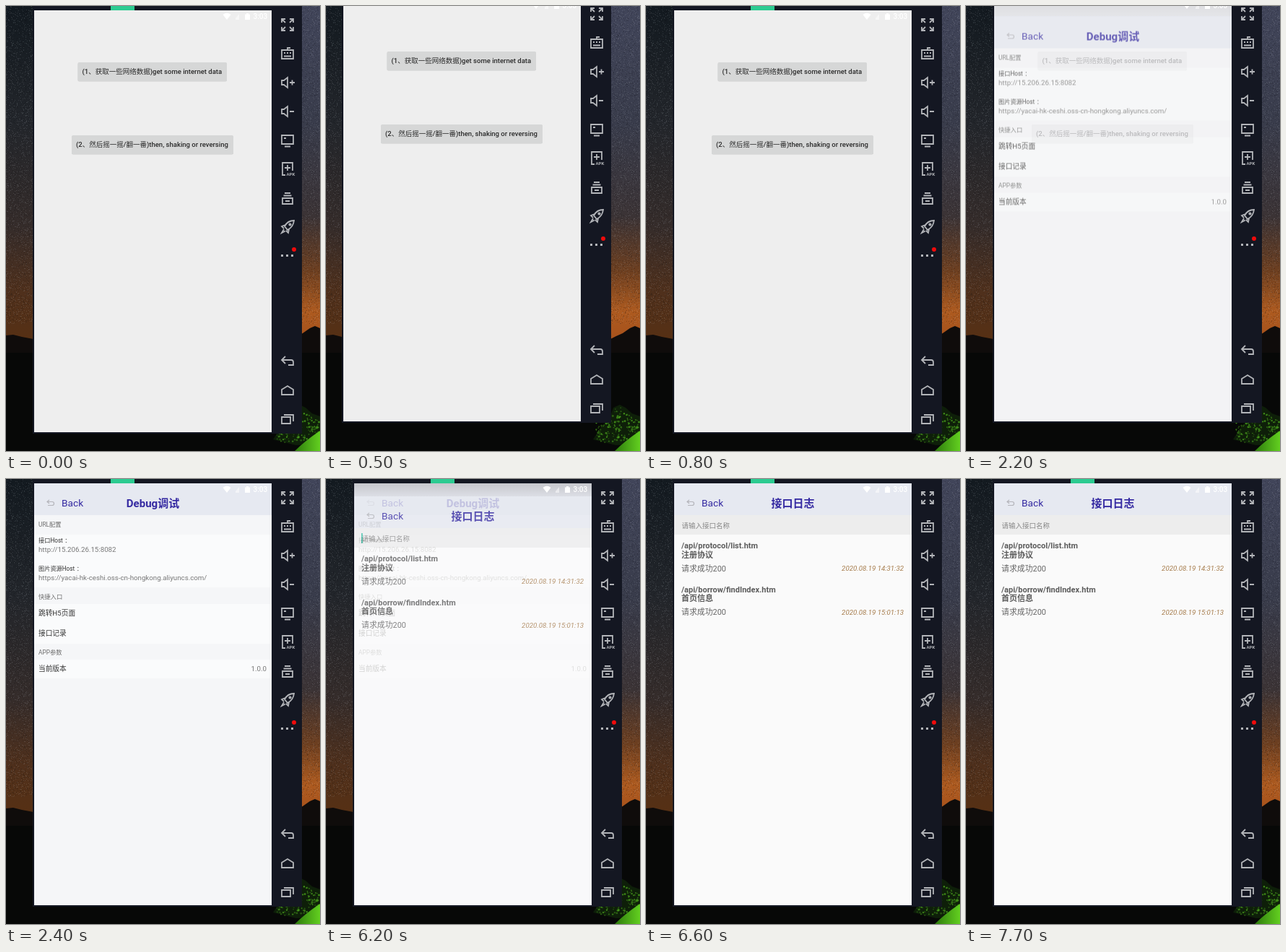
Recreate the animation shown at these times as an HTML page. Size 435 by 616 pixels, loop 8000 ms.

```html
<!DOCTYPE html>
<html lang="zh">
<head>
<meta charset="utf-8">
<title>Debug panel</title>
<style>
  html, body { margin: 0; width: 100%; height: 100%; overflow: hidden; background: #060707; }
  svg { display: block; width: 435px; height: 616px; }
  text { font-family: Roboto, "Noto Sans CJK SC", "Noto Sans CJK", sans-serif; }

  .btn { font-size: 9.5px; font-weight: 500; fill: #2b2b2b; }
  .nav { font-size: 13.7px; fill: #352aa2; }
  .title { font-size: 15px; font-weight: 700; fill: #352aa2; text-anchor: middle; }
  .sec { font-size: 8.3px; fill: #6c6c6c; }
  .key { font-size: 8.2px; fill: #333; }
  .val { font-size: 9.72px; fill: #777; }
  .row { font-size: 9.7px; fill: #333; }
  .api { font-size: 11px; font-weight: 700; fill: #5c5c5c; }
  .ok { font-size: 10.9px; fill: #666; }
  .date { font-size: 9.7px; font-style: italic; fill: #a67c4c; text-anchor: end; }
  .hint { font-size: 9.5px; fill: #868686; }
  .clock { font-size: 10px; font-weight: 500; fill: #fff; }
  .icon { fill: none; stroke: #b3b5b9; stroke-width: 1.8; }
  .solid { fill: #b3b5b9; stroke: none; }

  .win, .debug, .log, .dim1, .dim2, .caret { animation: 8s step-end infinite; }
  .win { animation-name: shake; }
  .debug { animation-name: debug; }
  .log { animation-name: log; }
  .dim1 { animation-name: dim1; }
  .dim2 { animation-name: dim2; }
  .caret { animation-name: blink; }

  @keyframes shake {
    0%, 10%, 28.75%, 100% { transform: none; }
    6.25% { transform: translate(-15px, -15px); }
    27.5% { transform: translate(0, -15px); }
  }
  @keyframes debug {
    0% { opacity: 0; transform: none; }
    27.5% { opacity: .72; transform: translateY(23.5px); }
    28.75% { opacity: .97; transform: translateY(3px); }
    30%, 100% { opacity: 1; transform: none; }
  }
  @keyframes log {
    0% { opacity: 0; transform: none; }
    77.5% { opacity: .8; transform: translateY(18px); }
    78.75%, 100% { opacity: 1; transform: none; }
  }
  @keyframes dim1 {
    0%, 28.75%, 100% { opacity: 0; }
    27.5% { opacity: .5; }
  }
  @keyframes dim2 {
    0%, 78.75%, 100% { opacity: 0; }
    77.5% { opacity: 1; }
  }
  @keyframes blink {
    0%, 88.75% { opacity: 1; }
    82.5%, 93.75%, 100% { opacity: 0; }
  }
</style>
</head>
<body>
<svg viewBox="0 0 435 616">
  <defs>
    <linearGradient id="west" x2="0" y2="1">
      <stop offset="0" stop-color="#131a20"/>
      <stop offset=".35" stop-color="#23262b"/>
      <stop offset=".65" stop-color="#352c2a"/>
      <stop offset=".84" stop-color="#4f301c"/>
      <stop offset="1" stop-color="#573013"/>
    </linearGradient>
    <linearGradient id="east" x2="0" y2="1">
      <stop offset="0" stop-color="#41455a"/>
      <stop offset=".35" stop-color="#393c4b"/>
      <stop offset=".62" stop-color="#3b3335"/>
      <stop offset=".78" stop-color="#6d3f20"/>
      <stop offset=".9" stop-color="#ad5a1f"/>
      <stop offset="1" stop-color="#a5501b"/>
    </linearGradient>
    <linearGradient id="bar" x2="0" y2="1">
      <stop offset="0" stop-color="#c6c7cc"/>
      <stop offset="1" stop-color="#dcdee5"/>
    </linearGradient>
    <linearGradient id="grass" x2="1" y2="0">
      <stop offset="0" stop-color="#2d7a0c"/>
      <stop offset="1" stop-color="#62cf20"/>
    </linearGradient>
    <clipPath id="screen"><path d="M39 6H368V590H39Z"/></clipPath>
    <g id="nav">
      <path d="M39 6H368V50H39Z" fill="#e6e9f1"/>
      <path d="M60 29l-3 2.5 3 2.5M57.500 31.500H64a2.500 2.500 0 0 1 0 5H58" fill="none" stroke="#b5b5bb" stroke-width="1.200"/>
      <text class="nav" x="77" y="38.300">Back</text>
    </g>
  </defs>

  <path d="M0 0H200V470H0Z" fill="url(#west)"/>
  <path d="M200 0H435V470H200Z" fill="url(#east)"/>
  <path id="stars" fill="#c3c6d2" opacity=".15"/>
  <path id="gaps" fill="#05060a" opacity=".22"/>
  <path d="M0 456L10 455 22 458 38 461 200 470 390 463 402 457 411 453 421 446 428 443 435 446V616H0Z" fill="#0f0c0b"/>
  <path d="M0 480H435V616H0Z" fill="#050606" opacity=".7"/>
  <path d="M370 600L380 584 393 570 398 556 407 552 415 556 424 564 435 568V606L402 608Z" fill="#0e1f09"/>
  <g id="leaves" fill="#479a1c"></g>
  <path d="M400 616Q414 602 435 588V616Z" fill="url(#grass)"/>

  <g class="win">
    <path d="M37 0H410V592H37Z" fill="#141722"/>
    <path d="M145 0H178V6H145Z" fill="#2ccb91"/>

    <g clip-path="url(#screen)">
      <path d="M39 6H368V590H39Z" fill="#eee"/>
      <g fill="#cdcdcd">
        <rect x="99.500" y="78.600" width="206.500" height="26" rx="2"/>
        <rect x="91" y="179.600" width="224" height="26" rx="2"/>
      </g>
      <g fill="#d6d7d7">
        <rect x="99.500" y="78" width="206.500" height="26" rx="2"/>
        <rect x="91" y="179" width="224" height="26" rx="2"/>
      </g>
      <text class="btn" x="105.500" y="94.300">(1、获取一些网络数据)get some internet data</text>
      <text class="btn" x="97" y="195.300">(2、然后摇一摇/翻一番)then, shaking or reversing</text>
      <path class="dim1" d="M39 6H368V30H39Z" fill="url(#bar)"/>

      <g class="debug">
        <path d="M39 6H368V590H39Z" fill="#f5f6f8"/>
        <path d="M39 77H368V150H39ZM39 173H368V228H39ZM39 250H368V276H39Z" fill="#fafbfc"/>
        <use href="#nav"/>
        <text class="title" x="203.500" y="39">Debug调试</text>
        <text class="sec" x="45" y="66">URL配置</text>
        <text class="key" x="45" y="88.300">接口Host<tspan dx="2.500">：</tspan></text>
        <text class="val" x="45" y="101">http://15.206.26.15:8082</text>
        <text class="key" x="45" y="127.300">图片资源Host<tspan dx="2.500">：</tspan></text>
        <text class="val" x="45" y="140">https://yacai-hk-ceshi.oss-cn-hongkong.aliyuncs.com/</text>
        <text class="sec" x="45" y="166">快捷入口</text>
        <text class="row" x="45" y="189">跳转H5页面</text>
        <text class="row" x="45" y="217">接口记录</text>
        <text class="sec" x="45" y="242.500">APP参数</text>
        <text class="row" x="45" y="266">当前版本</text>
        <text class="val" x="361" y="266" text-anchor="end">1.0.0</text>
      </g>

      <path class="dim2" d="M39 6H368V24H39Z" fill="url(#bar)"/>
      <g class="log">
        <path d="M39 6H368V590H39Z" fill="#fafafa"/>
        <path d="M39 50H368V77H39Z" fill="#ededed"/>
        <use href="#nav"/>
        <text class="title" x="203.500" y="39">接口日志</text>
        <text class="hint" x="49.500" y="67.500">请输入接口名称</text>
        <path class="caret" d="M49 57H50.700V71H49Z" fill="#35bfa6"/>
        <text class="api" x="49" y="96">/api/protocol/list.htm</text>
        <text class="api" x="49" y="108.500">注册协议</text>
        <text class="ok" x="49" y="128">请求成功200</text>
        <text class="date" x="357" y="127.300">2020.08.19 14:31:32</text>
        <text class="api" x="49" y="156.500">/api/borrow/findIndex.htm</text>
        <text class="api" x="49" y="169">首页信息</text>
        <text class="ok" x="49" y="188.300">请求成功200</text>
        <text class="date" x="357" y="187.800">2020.08.19 15:01:13</text>
      </g>

      <path d="M300.500 12Q306 7.500 311.500 12L306 19ZM331 11.500H333V10H336V11.500H338V19H331Z" fill="#fff"/>
      <path d="M318 19V17L323 11V19Z" fill="#fff" opacity=".5"/>
      <text class="clock" x="342.500" y="18">3:03</text>
    </g>

    <g class="icon">
      <path d="M382 23V18H387M382 18L387 23M393 18H398V23M398 18L393 23M382 29V34H387M382 34L387 29M398 29V34H393M398 34L393 29"/>
      <path d="M382 61H398V73H382ZM390 61V58H394M385 65H387M389 65H391M393 65H395M385 69.500H395"/>
      <path id="horn" d="M382 103H385L390 99V113L385 109H382Z"/>
      <use href="#horn" y="40"/>
      <path d="M393 106H400M396.500 102.500V109.500M393 146H399"/>
      <path d="M382 179H398V191H382ZM386 194.500H394M385 183H388"/>
      <path d="M387 234H383V217H397V228M390 220V228M386 224H394"/>
      <path d="M383 266H397V274H383ZM384.500 262.500H395.500M386 259H394M387 270H393"/>
      <path d="M399 297Q390 297 386 305L390 310Q398 306 399 297ZM387 303L382 305 385 308M392 309L391 314 388 311M385 309L382 314 387 311.500"/>
      <circle cx="393.500" cy="302.500" r="1.200"/>
      <path d="M387 485L382 490 387 495M382.500 490H395Q398 490 398 493V497H391"/>
      <path d="M382 538V531L390 526 398 531V538Z"/>
      <path d="M382 569H394V578H382ZM385 566H398V575"/>
    </g>
    <path class="solid" d="M381 344H384V347H381ZM388 344H391V347H388ZM395 344H398V347H395Z"/>
    <text class="solid" x="388.500" y="235" font-size="6" font-weight="700">APK</text>
    <circle cx="399" cy="337" r="3" fill="#f00b0b"/>
  </g>
</svg>
<script>
  let seed = 7;
  const rand = () => (seed = seed * 16807 % 2147483647) / 2147483647;
  const $ = id => document.getElementById(id);

  // Fine star grain over the two visible strips of sky
  const grain = count => {
    let d = '';
    for (let i = 0; i < count; i++) {
      const x = Math.floor(rand() * 80), y = Math.floor(rand() * 440);
      d += `M${x < 40 ? x : x + 355} ${y}h1v1h-1z`;
    }
    return d;
  };
  $('stars').setAttribute('d', grain(3600));
  $('gaps').setAttribute('d', grain(3600));

  // Small leaves on the bush
  let leaves = '';
  for (let i = 0; i < 170; i++) {
    const x = 374 + rand() * 61, top = 554 + Math.abs(x - 406) * .7;
    const y = top + rand() * (604 - top);
    leaves += `<circle cx="${x}" cy="${y}" r="${.6 + rand()}" opacity="${.3 + rand() * .6}"/>`;
  }
  $('leaves').innerHTML = leaves;
</script>
</body>
</html>
```
